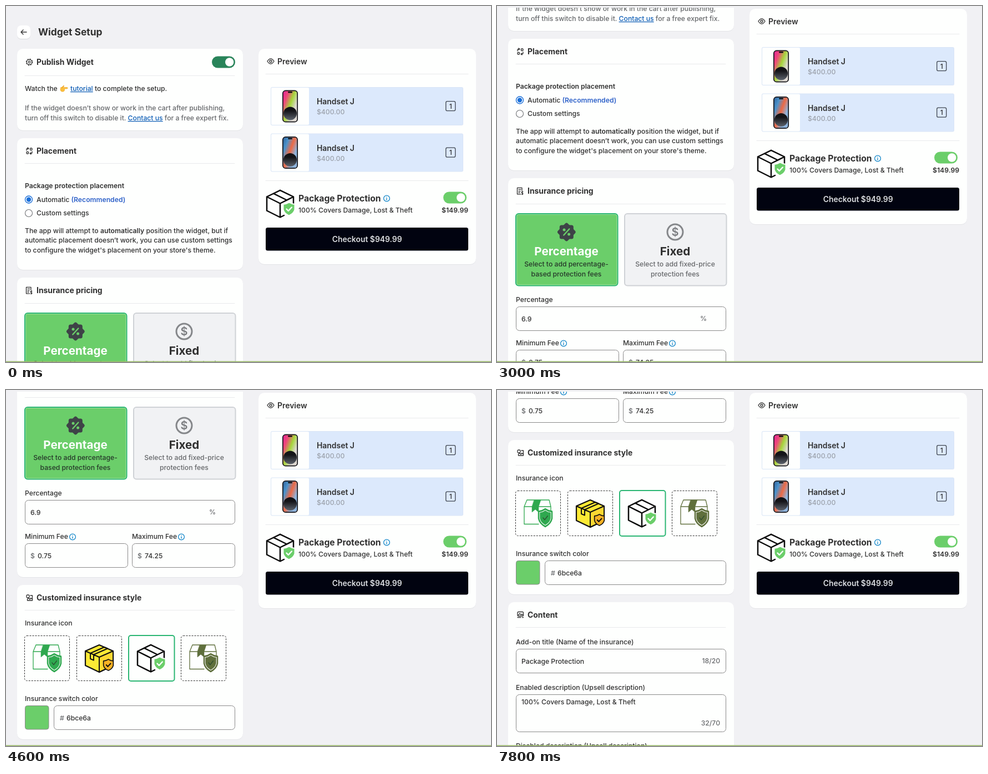
Write an HTML page that moves like this. It is 874 px wide and 641 px high and loops after 8 s.

```html
<!DOCTYPE html>
<html lang="en">
<head>
<meta charset="utf-8">
<title>Widget Setup</title>
<style>
  html, body { margin: 0; width: 100%; height: 100%; overflow: hidden; background: #f1f1f4; }
  svg { display: block; }
  text { font-family: Inter, sans-serif; white-space: pre; }
  .b { font-weight: 600; }
  .link { fill: #0b5cb5; text-decoration: underline; }
</style>
</head>
<body>
<svg id="stage" width="874" height="641" fill="none">
  <g id="form"></g>
  <g id="preview"></g>
  <path d="M0 0H874V3H0Z" fill="#f1f1f4"/>
  <path d="M0 640.3H874" stroke="#9bbb6b" stroke-width="1.4"/>
</svg>
<script>
const INK = '#303030', GREY = '#66686b', GREEN = '#6bce6a', ACCENT = '#2bb673', BLUE = '#1487c9';
const BODY = 12.18, HEAD = 13.92;

// Text is placed by the middle of its capitals.
const text = (x, mid, str, { size = BODY, weight = 450, fill = INK, anchor = 'start' } = {}) =>
  `<text x="${x}" y="${Math.round(mid + size * .364)}" font-size="${size}" font-weight="${weight}" fill="${fill}" text-anchor="${anchor}">${str}</text>`;
const rect = (x, y, w, h, r, fill, extra = '') =>
  `<rect x="${x}" y="${y}" width="${w}" height="${h}" rx="${r}" fill="${fill}" ${extra}/>`;
const path = (d, stroke = INK, width = 1, fill = 'none') =>
  `<path d="${d}" stroke="${stroke}" stroke-width="${width}" fill="${fill}" stroke-linejoin="round" stroke-linecap="round"/>`;
const circle = (x, y, r, fill, extra = '') => `<circle cx="${x}" cy="${y}" r="${r}" fill="${fill}" ${extra}/>`;
const at = (x, y, body) => `<g transform="translate(${x} ${y})">${body}</g>`;
const line = (x1, x2, y) => path(`M${x1} ${y}H${x2}`, '#e9eaec');
const card = (x, y, w, h) => rect(x, y + 1, w, h, 10.5, '#e3e4e7') + rect(x, y, w, h, 10.5, '#fefffe');
const field = (x, y, w, h = 43) => rect(x + .5, y + .5, w - 1, h, 6, '#fefffe', 'stroke="#8a8a8a"');
const info = (x, y) => circle(x, y, 5.4, 'none', `stroke="${BLUE}" stroke-width="1.3"`) +
  path(`M${x} ${y - .3}v2.8M${x} ${y - 2.6}v.1`, BLUE, 1.4);
const toggle = (x, y, fill) => rect(x, y, 42, 21, 10.5, fill) + circle(x + 31.7, y + 10.5, 7.7, '#fff');
const heading = (y, title, icon) => at(42, y, icon) + text(55, y, title, { size: HEAD, weight: 700 });

const ICONS = {
  gear: circle(0, 0, 4.7, 'none', `stroke="${INK}" stroke-width="1.2"`) +
    circle(0, 0, 5.6, 'none', `stroke="${INK}" stroke-width="1.3" stroke-dasharray="2.2 2.2"`) +
    circle(0, 0, 1.8, 'none', `stroke="${INK}" stroke-width="1.2"`),
  place: path('M-5 -1v-2a1.5 1.5 0 0 1 1.5 -1.5h2M5 1v2a1.5 1.5 0 0 1 -1.5 1.5h-2M-3 -6l2 1.5l-2 1.5M3 6l-2 -1.5l2 -1.5', INK, 1.3) +
    rect(1.5, -5, 3.5, 3.5, 1, 'none', `stroke="${INK}" stroke-width="1.3"`) +
    rect(-5, 1.5, 3.5, 3.5, 1, 'none', `stroke="${INK}" stroke-width="1.3"`),
  price: path('M3 -1v-5h-8.5v11.5h6M-3 -3h4M-3 0h3M-3 2.7h2', INK, 1.3) +
    path('M5 1.2h-2q-1.5 1.2 0 2.2q3 .5 1.5 2.3h-2.5M3.6 0v6.5', INK, 1.1),
  style: rect(-5, -5, 5, 5, 1.5, 'none', `stroke="${INK}" stroke-width="1.3"`) +
    path('M2 -4h3.5v9h-9v-2.500l2.500 -2l2 2.500l2 -2.500l2.500 2.500', INK, 1.3),
  content: rect(-5, -5, 10.5, 7.5, 1.5, 'none', `stroke="${INK}" stroke-width="1.3"`) +
    path('M-4 1l3 -3l2.5 2.5l1.5 -1.5l2 2M-5 5h6M3.5 5h2', INK, 1.3),
  eye: path('M-6 0Q-3 -4.7 0 -4.7T6 0Q3 4.7 0 4.7T-6 0Z', INK, 1.3) +
    circle(0, 0, 2, 'none', `stroke="${INK}" stroke-width="1.3"`),
  hand: path('M1 -2.5H12.5Q14 -1 12.5 0H7.5V3Q6 6 3 5Q0 5 0 1Z', '#e9a126', .6, '#fbbf3c') + path('M3 -2l3 -3', '#f2ac2c', 2)
};

const SHIELD = 'M0 -12Q5 -9 10.5 -8.5V1Q9 8 0 12Q-9 8 -10.5 1V-8.5Q-5 -9 0 -12Z';
const TICK = 'M-4.5 0l3.3 3.5l6 -6.5';
const shield = (x, y, scale, fill, tick, edge = '#fff') =>
  `<g transform="translate(${x} ${y}) scale(${scale})">${path(SHIELD, edge, 2, fill)}${path(TICK, tick, 2.4)}</g>`;

const outlineBox = path('M25 .8L49 12.5V26M25 .8L1 12.5V37.5L25 49.5L32 46M1 12.5L25 24.500V49M25 24.500L49 12.5M13 6.7L37 18.500', '#0b0b0b', 2.5) +
  shield(41, 34.500, 1, GREEN, '#fff');
const yellowBox = path('M26 1L51 12V38L26 50L1 38V12Z', '#111', 2.2, '#fdea35') +
  path('M26 23L51 12V38L26 50Z', '#111', 2, '#fdd832') +
  path('M1 12L26 23M10 16V26L16 28.500V18.500L41 7.500L35 5L10 16', '#111', 2) +
  shield(42.5, 37, .84, '#f8b224', '#111', '#111');
const ribbonBox = color =>
  path('M6 1H46L49 13V20M6 1L1 13V44.500H27M1 13H49', color, 1.3) +
  path('M19 1H31L27 13V23L21 18L15 23V13Z', color, .5, color) +
  `<g transform="translate(39 33) scale(1.14 1.32)">${path(SHIELD, color, 2.2, '#fff')}</g>` +
  `<g transform="translate(39 33) scale(.9 1.06)">${path(SHIELD, color, .5, color)}${path(TICK, '#2c4a30', 1.3)}</g>`;

// A screen glows diagonally in four hues behind a dark ball.
const phone = (id, x, y, hues) => at(x, y,
  `<linearGradient id="${id}" x2="1" y2=".8">${hues.map((c, i) => `<stop offset="${i * .26}" stop-color="${c}"/>`).join('')}</linearGradient>
  <linearGradient id="${id}-ball" x2="0" y2="1"><stop offset=".3" stop-color="#141418"/><stop offset="1" stop-color="#5d636d"/></linearGradient>` +
  rect(1, 1, 26, 56, 5, `url(#${id})`) +
  circle(14, 42, 12, `url(#${id}-ball)`) +
  rect(.8, .8, 26.4, 56.4, 5, 'none', 'stroke="#15151a" stroke-width="1.7"') + rect(10, 2.500, 8, 2.4, 1.2, '#111'));

const product = (id, y, hues) =>
  rect(477.5, y + .5, 346, 68, 2, '#dce9fc', 'stroke="#d9e5f6"') + rect(478, y + 1, 68, 67, 2, '#fefffe') +
  phone(id, 498, y + 5.5, hues) +
  text(560, y + 26, 'Handset J', { size: HEAD, weight: 600 }) +
  text(560, y + 45, '$400.00', { weight: 500, fill: '#9ba1ab' }) +
  rect(792.7, y + 25.7, 17, 17, 2.5, 'none', 'stroke="#3f4650" stroke-width="1.3"') +
  text(801.2, y + 34.5, '1', { anchor: 'middle', weight: 500 });

const option = (x, y, fill, stroke, title, titleFill, lines, lineFill) =>
  rect(x + 1, y + 1, 183.5, 129.5, 5, fill, `stroke="${stroke}" stroke-width="2"`) +
  text(x + 92, y + 69, title, { size: 20.6, weight: 650, fill: titleFill, anchor: 'middle' }) +
  lines.map((s, i) => text(x + 92, y + 92 + i * 17.5, s, { anchor: 'middle', fill: lineFill })).join('');

const tile = (x, body, chosen) =>
  (chosen ? rect(x, 964, 82.5, 82, 4, 'none', `stroke="${ACCENT}" stroke-width="2"`)
          : rect(x + .5, 964.5, 81, 81, 4, 'none', 'stroke="#333" stroke-dasharray="3 2"')) +
  at(x + 15, 980, body);

const badge = [0, 45].map(a => rect(-12.5, -12.5, 25, 25, 3.5, '#3e4347', `transform="rotate(${a})"`)).join('') +
  path('M5 -5.5L-5 5.5', GREEN, 2.4) + circle(-4.3, -4, 2.5, GREEN) + circle(4.3, 4, 2.5, GREEN);

form.innerHTML = [
  rect(20, 36, 24, 24, 7, '#d9dadd'), rect(20, 35, 24, 24, 7, '#fff'),
  path('M37 47H27M31 43L27 47L31 51', '#3a3a3a', 1.5),
  text(58, 47, 'Widget Setup', { size: 17.4, weight: 650 }),

  card(20, 77, 407, 147),
  heading(101, 'Publish Widget', ICONS.gear), toggle(371, 90.5, '#29845a'), line(34, 412, 125.5),
  text(34, 149, 'Watch the'), at(98, 149, ICONS.hand),
  text(116, 149, '<tspan class="link">tutorial</tspan> to complete the setup.'),
  text(34, 184, 'If the widget doesn’t show or work in the cart after publishing,', { fill: GREY }),
  text(34, 201.4, 'turn off this switch to disable it. <tspan class="link">Contact us</tspan> for a free expert fix.', { fill: GREY }),

  card(20, 238, 407, 237),
  heading(261, 'Placement', ICONS.place), line(34, 412, 283.5),
  text(34, 324, 'Package protection placement', { weight: 600 }),
  circle(41, 348.5, 6.5, '#fff', 'stroke="#1a6fd8" stroke-width="1.4"'), circle(41, 348.5, 4.2, '#1a6fd8'),
  text(55, 348.5, 'Automatic <tspan class="b" fill="#2f62c9">(Recommended)</tspan>'),
  circle(41, 373, 6.5, '#fff', 'stroke="#6f7275" stroke-width="1.1"'),
  text(55, 373, 'Custom settings'),
  text(34, 404.6, 'The app will attempt to <tspan class="b">automatically</tspan> position the widget, but if'),
  text(34, 422, 'automatic placement doesn’t work, you can use custom settings'),
  text(34, 439.4, "to configure the widget's placement on your store's theme."),

  card(20, 489, 407, 370),
  heading(512.3, 'Insurance pricing', ICONS.price), line(34, 412, 535.5),
  option(33, 552, GREEN, ACCENT, 'Percentage', '#fff', ['Select to add percentage-', 'based protection fees'], '#26382a'),
  rect(35.5, 554.5, 180.5, 126.5, 3, 'none', 'stroke="#9de09c"'),
  option(229, 552, '#f1f2f4', '#cfd2d6', 'Fixed', INK, ['Select to add fixed-price', 'protection fees'], GREY),
  at(125.3, 586, badge),
  circle(321, 586, 14, 'none', 'stroke="#85878a" stroke-width="3"'),
  text(321, 586, '$', { size: 20, weight: 600, fill: '#7b7d80', anchor: 'middle' }),
  text(34, 708, 'Percentage'), field(34, 720, 379), text(44, 742.5, '6.9'),
  text(366, 742, '%', { fill: GREY }),
  text(34, 786, 'Minimum Fee'), info(120, 786.5), field(34, 798, 186),
  text(227, 786, 'Maximum Fee'), info(316, 786.5), field(227, 798, 186),
  text(44, 820.5, '$', { fill: GREY }), text(57, 820.5, '0.75'),
  text(237, 820.5, '$', { fill: GREY }), text(250, 820.5, '74.25'),

  card(20, 873, 407, 278),
  heading(896, 'Customized insurance style', ICONS.style), line(34, 412, 918.5),
  text(34, 942, 'Insurance icon'),
  tile(33, ribbonBox('#2fa84f')), tile(127, yellowBox), tile(221, outlineBox, true), tile(315, ribbonBox('#5f6f3c')),
  text(34, 1077.5, 'Insurance switch color'),
  rect(34.5, 1090.5, 42.5, 42.5, 4, GREEN, 'stroke="#8a8a8a"'), field(86, 1090, 327),
  text(97, 1112.5, '#', { fill: GREY }), text(109, 1112.5, '6bce6a'),

  card(20, 1165, 407, 420),
  heading(1187.5, 'Content', ICONS.content), line(34, 412, 1210.5),
  text(34, 1237, 'Add-on title (Name of the insurance)'), field(34, 1249, 379),
  text(44, 1271.5, 'Package Protection'), text(402, 1271, '18/20', { fill: GREY, anchor: 'end' }),
  text(34, 1318.5, 'Enabled description (Upsell description)'), field(34, 1331, 379, 67),
  text(44, 1345, '100% Covers Damage, Lost &amp; Theft'), text(402, 1383, '32/70', { fill: GREY, anchor: 'end' }),
  text(34, 1424, 'Disabled description (Upsell description)')
].join('');

preview.innerHTML = [
  card(455, 77, 392, 388),
  at(477, 99.5, ICONS.eye), text(489, 99.5, 'Preview', { size: HEAD, weight: 600 }), line(468, 833, 122.5),
  product('warm', 146, ['#e0209a', '#ee4a78', '#a6d63a', '#ddd8d2']),
  product('cool', 229.5, ['#2f5f96', '#4b93cc', '#ee6a45', '#8fb4dc']),
  line(468, 833, 314.5),
  at(469, 331, outlineBox),
  text(527, 346.3, 'Package Protection', { size: 15.66, weight: 650 }), info(686, 346.5),
  text(527, 367.5, '100% Covers Damage, Lost &amp; Theft'),
  toggle(788, 334.5, GREEN),
  text(833, 367.5, '$149.99', { weight: 600, anchor: 'end' }),
  rect(468, 399, 365, 41.5, 3.5, '#010310'),
  text(650.7, 420, 'Checkout $949.99', { size: HEAD, weight: 600, fill: '#dcdee1', anchor: 'middle' })
].join('');

// Wheel scrolls: [start ms, distance px]; the screen refreshes every 200 ms.
const SCROLLS = [[1785, 174], [2960, 174], [4180, 174], [5180, 87], [6210, 87], [7210, 87]];
const STICK = 72, LOOP = 8000, STEP = 200, DURATION = 410;
const ease = p => p * p * (3 - 2 * p);
const clamp = p => Math.min(1, Math.max(0, p));

function draw(now) {
  const t = Math.floor(now % LOOP / STEP) * STEP;
  const scroll = Math.round(SCROLLS.reduce((sum, [start, dist]) => sum + dist * ease(clamp((t - start) / DURATION)), 0));
  form.setAttribute('transform', `translate(0 ${-scroll})`);
  preview.setAttribute('transform', `translate(0 ${-Math.min(scroll, STICK)})`);
  requestAnimationFrame(draw);
}
draw(0);
</script>
</body>
</html>
```
